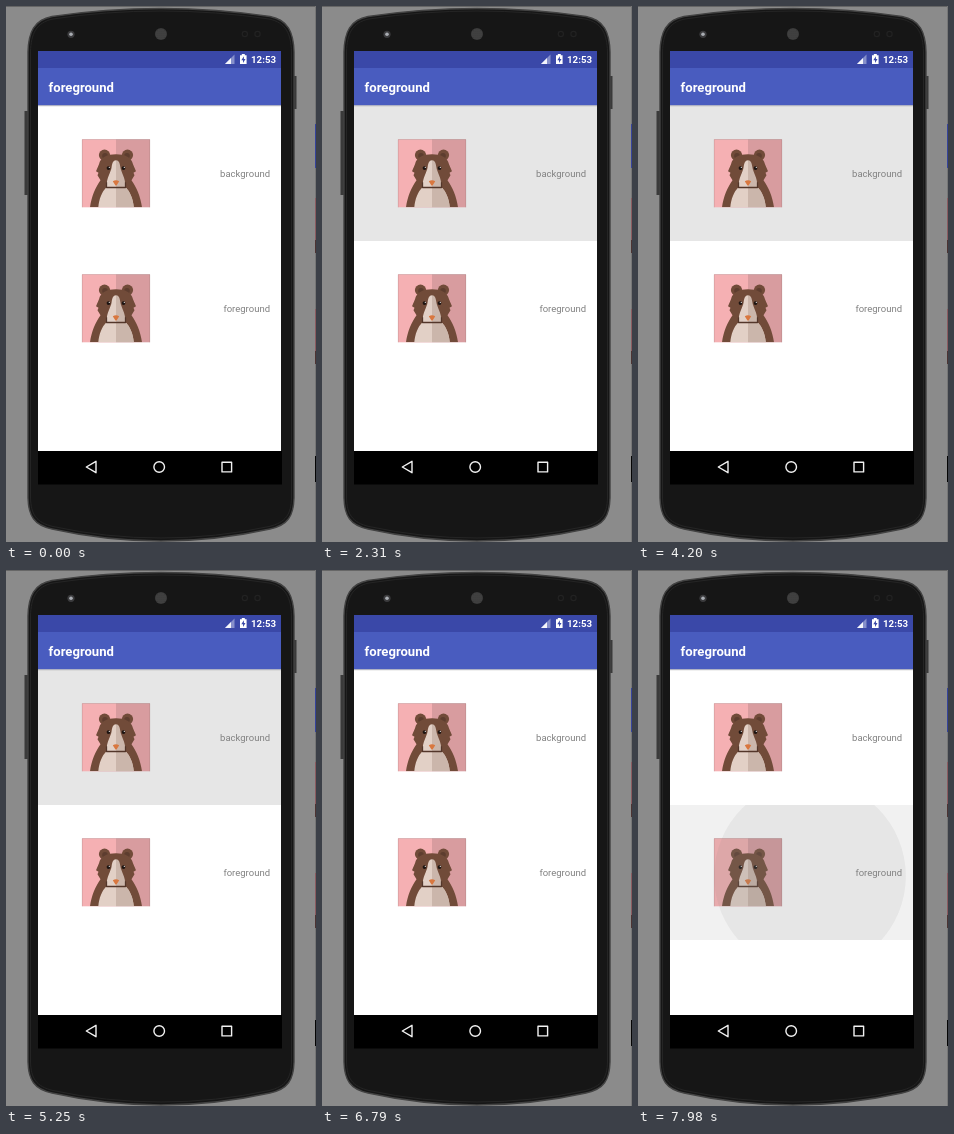
An HTML page with a canvas that plays this animation: 310x536 px, repeating every 8 s.

```html
<!DOCTYPE html>
<html lang="en">
<head>
<meta charset="utf-8">
<title>Ripple demo</title>
<style>
html, body { margin: 0; width: 100%; height: 100%; overflow: hidden; background: #8b8b8b; }
canvas { display: block; width: 310px; height: 536px; }
</style>
</head>
<body>
<canvas id="stage"></canvas>
<script>
const W = 310, H = 536, LOOP = 8000, STEP = 70;
const canvas = document.getElementById('stage');
const ctx = canvas.getContext('2d');
const dpr = window.devicePixelRatio || 1;
canvas.width = W * dpr;
canvas.height = H * dpr;

const ROW = { x: 32, w: 243, h: 135 };
const ROW_TOPS = [100, 235];
const FULL_RADIUS = 139;
const GROW_MS = 1342;
const FADE_MS = 450;
const presses = [
  { row: 0, x: 193, y: 177, down: 717, up: 2560 },
  { row: 0, x: 196, y: 178, down: 3413, up: 5500 },
  { row: 1, x: 213, y: 314, down: 7793, up: Infinity }
];

const clamp = v => Math.max(0, Math.min(1, v));
const mix = (a, b, k) => a + (b - a) * k;

function rect(x, y, w, h, fill) {
  ctx.fillStyle = fill;
  ctx.fillRect(x, y, w, h);
}

function disc(x, y, r, fill) {
  ctx.fillStyle = fill;
  ctx.beginPath();
  ctx.arc(x, y, r, 0, Math.PI * 2);
  ctx.fill();
}

function shape(d, fill, stroke, width = 1) {
  const path = new Path2D(d);
  if (fill) { ctx.fillStyle = fill; ctx.fill(path); }
  if (stroke) { ctx.strokeStyle = stroke; ctx.lineWidth = width; ctx.stroke(path); }
}

function label(text, x, y, size, weight, fill, align = 'left') {
  ctx.font = `${weight} ${size}px Roboto, sans-serif`;
  ctx.textAlign = align;
  ctx.fillStyle = fill;
  ctx.fillText(text, x, y);
}

function clipped(x, y, w, h, draw) {
  ctx.save();
  ctx.beginPath();
  ctx.rect(x, y, w, h);
  ctx.clip();
  draw();
  ctx.restore();
}

function backdrop() {
  rect(0, 0, W, H, '#8b8b8b');
  rect(0, 0, W, 1, '#666');
  rect(309, 0, 1, H, '#777');
  rect(309, 118, 1, 44, '#35439c');
  for (const y of [192, 303]) {
    rect(309, y, 1, 55, '#8b5b60');
    rect(309, y + 42, 1, 13, '#4d3433');
  }
  rect(309, 450, 1, 26, '#050505');
}

function phone() {
  rect(18.5, 105, 4, 84, '#3a3a3a');
  rect(287, 70, 3.5, 33, '#3a3a3a');
  shape('M22 46 C22.5 26 28 14 46 10.5 Q100 2.5 155 2.5 Q210 2.5 264 10.5 C282 14 287.5 26 288 46' +
    ' V492 C287.5 510 282 519 264 523 Q210 535 155 535 Q100 535 46 523 C28 519 22.5 510 22 492Z',
    '#161616', '#424242', 1.4);
  shape('M24.5 46 C25 28 30 16.5 47 13 Q100 5 155 5 Q210 5 263 13 C280 16.5 285 28 285.5 46' +
    ' V492 C285 508 280 516.5 263 520.5 Q210 532 155 532 Q100 532 47 520.5 C30 516.5 25 508 24.5 492Z',
    null, '#252525', 1);

  disc(65, 28.3, 3.6, '#3b3b3d');
  disc(65, 28.3, 1.8, '#a9adb3');
  disc(155, 28, 6.1, '#3a3a3a');
  for (let i = -2; i <= 2; i++) {
    for (let j = -2; j <= 2; j++) {
      if (i * i + j * j < 7) disc(155 + i * 2, 28 + j * 2, 0.6, '#555');
    }
  }
  for (const x of [238.8, 251.5]) {
    disc(x, 28, 3.2, '#222');
    disc(x, 28, 2, '#161616');
  }
}

function bars() {
  rect(32, 45, 243, 17, '#3a48a8');
  rect(32, 62, 243, 37, '#495cbf');
  rect(32, 99, 243, 1, '#aeb1c4');
  rect(32, 100, 243, 1, 'rgba(0,0,0,.06)');
  label('foreground', 42.6, 85.5, 13.1, 700, '#fff');

  shape('M219 58 L228.5 48.5 V58Z', '#8690cb');
  shape('M219 58 L225 52 V58Z', '#f4f5fb');
  shape('M235.8 48 H238.8 V49.2 H240.6 V58 H234 V49.2 H235.8Z', '#fff');
  shape('M237.9 50.3 L235.3 54.2 H237 V57 L239.5 53 H237.9Z', '#3a48a8');
  label('12:53', 270, 57.3, 9.7, 700, '#fff', 'right');

  rect(32, 445, 244, 33.5, '#000');
  ctx.lineJoin = 'round';
  shape('M80.3 461 L90 455.3 V466.7Z', null, '#f2f2f2', 1.4);
  shape('M147.9 461 a5.3 5.3 0 1 0 10.6 0 a5.3 5.3 0 1 0 -10.6 0Z', null, '#f2f2f2', 1.4);
  shape('M216 456.3 h9.6 v9.6 h-9.6Z', null, '#f2f2f2', 1.4);
}

function bear(x, y) {
  ctx.save();
  ctx.translate(x, y);
  rect(0, 0, 34, 68, '#f5b0b3');
  rect(34, 0, 34, 68, '#d89c9f');
  clipped(0, 0, 68, 68, () => {
    for (const side of [-1, 1]) {
      disc(34 + side * 11.5, 15.8, 5.6, '#714b39');
      disc(34 + side * 11, 16.6, 2.8, '#5d3d2f');
    }
    shape('M34 15 C25 15 18.5 18 17 25 L14 32 L16.5 33.5 L15.5 36 L18.5 41' +
      ' C13.5 48 9.5 57 8 68 H60 C58.5 57 54.5 48 49.5 41 L52.5 36 L51.5 33.5 L54 32 L51 25' +
      ' C49.5 18 43 15 34 15Z', '#714b39');
    shape('M24.5 48 C19.5 53 17 60 16.3 68 H51.7 C51 60 48.5 53 43.5 48Z', '#e2d0c6');
    shape('M34 48 H43.5 C48.5 53 51 60 51.7 68 H34Z', '#cbb6ab');
    shape('M34 21 C31 21 30.2 24 29.6 28 C29 33 24.5 38 24.5 48 H34Z', '#e2d0c6');
    shape('M34 21 C37 21 37.8 24 38.4 28 C39 33 43.5 38 43.5 48 H34Z', '#cbb6ab');
    shape('M24.5 43 V48.2 H43.5 V43', null, '#53362a', 1.3);
    shape('M30.8 42 Q34 40 37.2 42 L34.7 46 Q34 46.8 33.3 46Z', '#d9773f');
  });
  for (const ex of [26.5, 41.5]) {
    disc(ex, 28.8, 1.9, '#1d1411');
    disc(ex + 0.8, 28.1, 0.55, '#eee');
  }
  shape('M.25 68 V.25 H67.75 V68', null, 'rgba(125,105,105,.45)', 0.5);
  ctx.restore();
}

const haze = alpha => `rgba(128,128,128,${alpha})`;

function ripple(press, t) {
  const age = t - press.down;
  if (age < 0 || t > press.up + FADE_MS) return;
  const top = ROW_TOPS[press.row];
  const fade = 1 - clamp((t - press.up) / FADE_MS);
  const tint = clamp((age - 15) / 120);
  const k = 1 - Math.pow(400, -1.4 * age / GROW_MS);
  clipped(ROW.x, top, ROW.w, ROW.h, () => {
    rect(ROW.x, top, ROW.w, ROW.h, haze(0.11 * tint * fade));
    const cx = mix(press.x, ROW.x + ROW.w / 2, k);
    const cy = mix(press.y, top + ROW.h / 2, k);
    // The wave always reaches the row corners once fully grown.
    const r = FULL_RADIUS * k + 2 * clamp((k - 0.9) * 10);
    disc(cx, cy, r, haze(mix(0.14, 0.1, tint) * fade));
  });
}

function content(i) {
  const top = ROW_TOPS[i];
  bear(76, top + 33.3);
  label(['background', 'foreground'][i], 264, top + 70.8, 9.5, 400, '#818181', 'right');
}

function draw(t) {
  ctx.setTransform(dpr, 0, 0, dpr, 0, 0);
  backdrop();
  phone();
  rect(32, 45, 243, 400, '#fff');
  const waves = row => presses.filter(p => p.row === row).forEach(p => ripple(p, t));
  waves(0);
  content(0);
  content(1);
  waves(1);
  bars();
}

const start = performance.now();
function tick() {
  const t = (performance.now() - start) % LOOP;
  draw(Math.floor(t / STEP) * STEP);
  requestAnimationFrame(tick);
}
tick();
</script>
</body>
</html>
```
